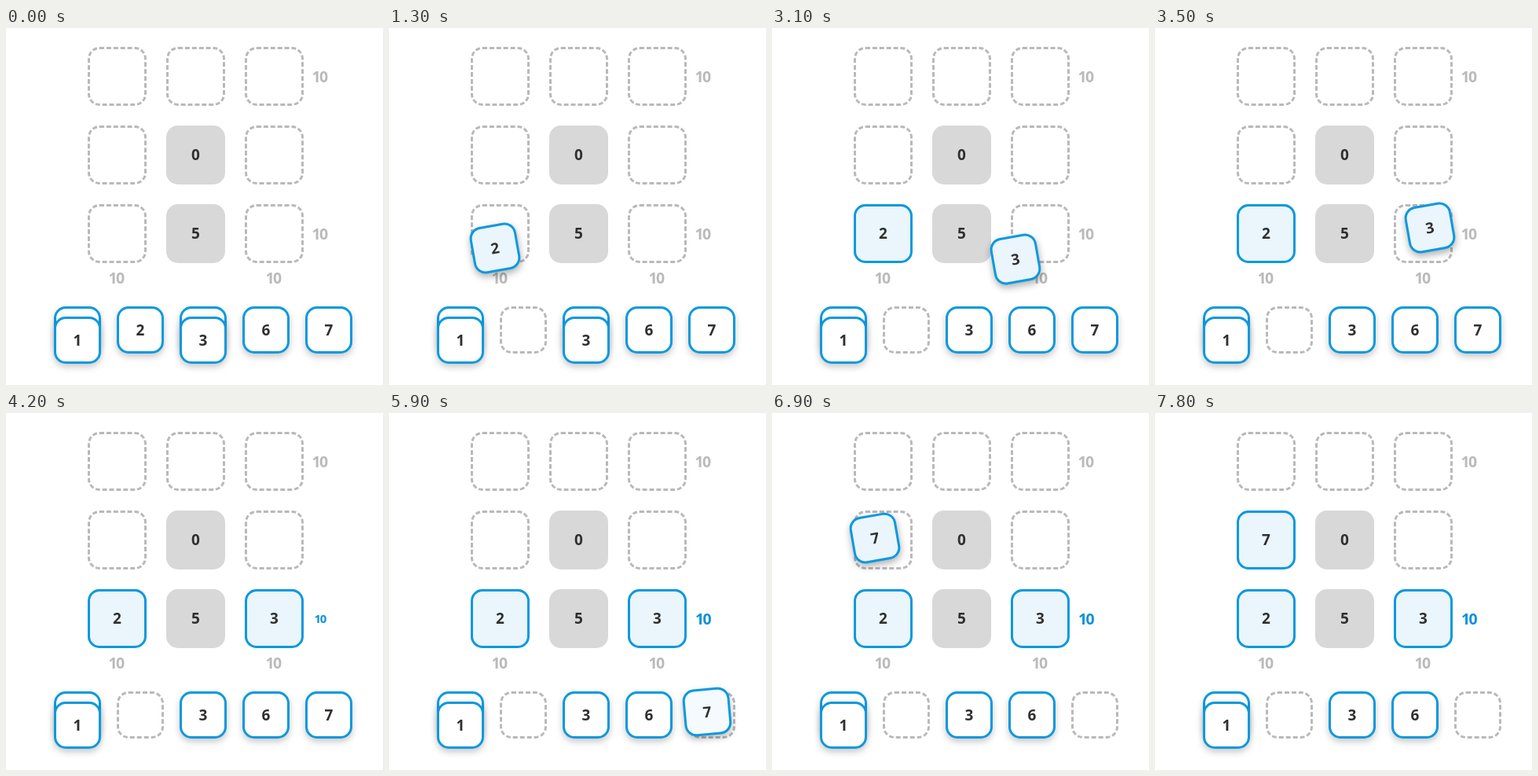
Animation, 480 px wide and 454 px high, one loop 8 s. Source, as an HTML page:

```html
<!DOCTYPE html>
<html lang="en">
<head>
<meta charset="utf-8">
<title>Number puzzle</title>
<style>
  html, body { margin: 0; width: 100%; height: 100%; overflow: hidden; background: #fff; }
  #stage { position: absolute; left: 0; top: 0; width: 480px; height: 454px; overflow: hidden; }
  #stage div {
    position: absolute; box-sizing: border-box; border-radius: 15px;
    display: flex; align-items: center; justify-content: center;
    font: 700 19px/1 "Noto Sans", "Open Sans", sans-serif; color: #303030;
  }
  #stage .slot { border: 3px dashed #b9b9b9; }
  #stage .fixed { background: #d8d8d8; }
  #stage .tile { border: 3px solid #0a99de; background: #fff; }
  #stage .rest { box-shadow: 0 4px 8px rgba(0, 0, 0, .22); }
  #stage .sum { color: #bababa; font-size: 19.5px; letter-spacing: -1.8px; text-indent: -3.2px; }
</style>
</head>
<body>
<div id="stage"></div>
<script>
const LOOP = 8000;
const stage = document.getElementById('stage');

const clamp = v => Math.max(0, Math.min(1, v));
const span = (t, a, b) => clamp((t - a) / (b - a));
const mix = (a, b, k) => a + (b - a) * k;
const easeSine = k => (1 - Math.cos(Math.PI * k)) / 2;
const easeOut = k => 1 - (1 - k) ** 3;

function place(el, cx, cy, size) {
  el.style.left = cx - size / 2 + 'px';
  el.style.top = cy - size / 2 + 'px';
  el.style.width = el.style.height = size + 'px';
}

function add(kind, cx, cy, size, text = '') {
  const el = document.createElement('div');
  el.className = kind;
  el.textContent = text;
  place(el, cx, cy, size);
  stage.append(el);
  return el;
}

// Board
const cell = i => 141.5 + i * 100;
const fixed = { '1,1': 0, '1,2': 5 };
for (let row = 0; row < 3; row++) {
  for (let col = 0; col < 3; col++) {
    const value = fixed[col + ',' + row];
    const kind = value === undefined ? 'slot' : 'fixed';
    add(kind, cell(col), cell(row) - 80, 75, value);
  }
}
add('sum', 400.5, 61.5, 40, '10');
add('sum', 141.5, 317.5, 40, '10');
add('sum', 341.5, 317.5, 40, '10');
const rowSum = add('sum', 400.5, 261.5, 40, '10');

// Tray
const tray = i => 91 + i * 80;
const emptied = [1, 4].map(i => add('slot', tray(i), 384, 60));
add('tile rest', tray(0), 384, 60);
add('tile rest', tray(0), 397, 60, '1');
add('tile rest', tray(2), 384, 60, '3');
add('tile rest', tray(3), 384, 60, '6');

// Each drag runs from its tray spot past the cell, drifts back, then snaps in
const drags = [
  { text: '2', start: 940, reach: 560, drop: 700, settle: 220, slot: emptied[0],
    from: [171, 384], over: [121, 240], hold: [127, 247], goal: [141.5, 261.5], bow: [0, 0] },
  { text: '3', start: 2640, reach: 770, drop: 880, settle: 240,
    from: [251, 397], over: [352, 250], hold: [350, 254], goal: [341.5, 261.5], bow: [-7.4, -8.4] },
  { text: '7', start: 5840, reach: 674, drop: 1060, settle: 240, slot: emptied[1],
    from: [411, 384], over: [113, 152], hold: [131, 159], goal: [141.5, 161.5], bow: [0, 6] }
];
for (const d of drags) d.el = add('tile', d.from[0], d.from[1], 60, d.text);

function drawDrag(d, t) {
  const age = t - d.start;
  const go = easeSine(span(age, 0, d.reach));
  const back = easeSine(span(age, d.reach, d.drop));
  const snap = easeOut(span(age, d.drop, d.drop + d.settle));
  const lift = span(age, 0, 120);
  const at = i => {
    const out = mix(d.from[i], d.over[i], go) + d.bow[i] * Math.sin(Math.PI * go);
    return mix(mix(out, d.hold[i], back), d.goal[i], snap);
  };
  place(d.el, at(0), at(1), mix(60, 75, snap));
  const style = d.el.style;
  style.transform = `rotate(${-10 * lift * (1 - snap)}deg)`;
  style.background = `rgb(${mix(255, 234, lift)}, ${mix(255, 245, lift)}, ${mix(255, 252, lift)})`;
  style.boxShadow = `0 4px ${mix(8, 10, lift)}px rgba(0, 0, 0, ${mix(.22, .32, lift) * (1 - snap)})`;
  style.zIndex = age > 0 && snap < 1 ? 2 : 0;
  if (d.slot) d.slot.style.visibility = age > 0 ? 'visible' : 'hidden';
}

function drawSum(t) {
  const solved = t >= 3950;
  const scale = solved ? easeOut(span(t, 3950, 4600)) : 1 - span(t, 3760, 3950);
  rowSum.style.color = solved ? '#0a92d8' : '#bababa';
  rowSum.style.transform = `scale(${scale})`;
}

function frame(now) {
  const t = now % LOOP;
  for (const d of drags) drawDrag(d, t);
  drawSum(t);
  requestAnimationFrame(() => frame(performance.now()));
}
frame(0);
</script>
</body>
</html>
```
